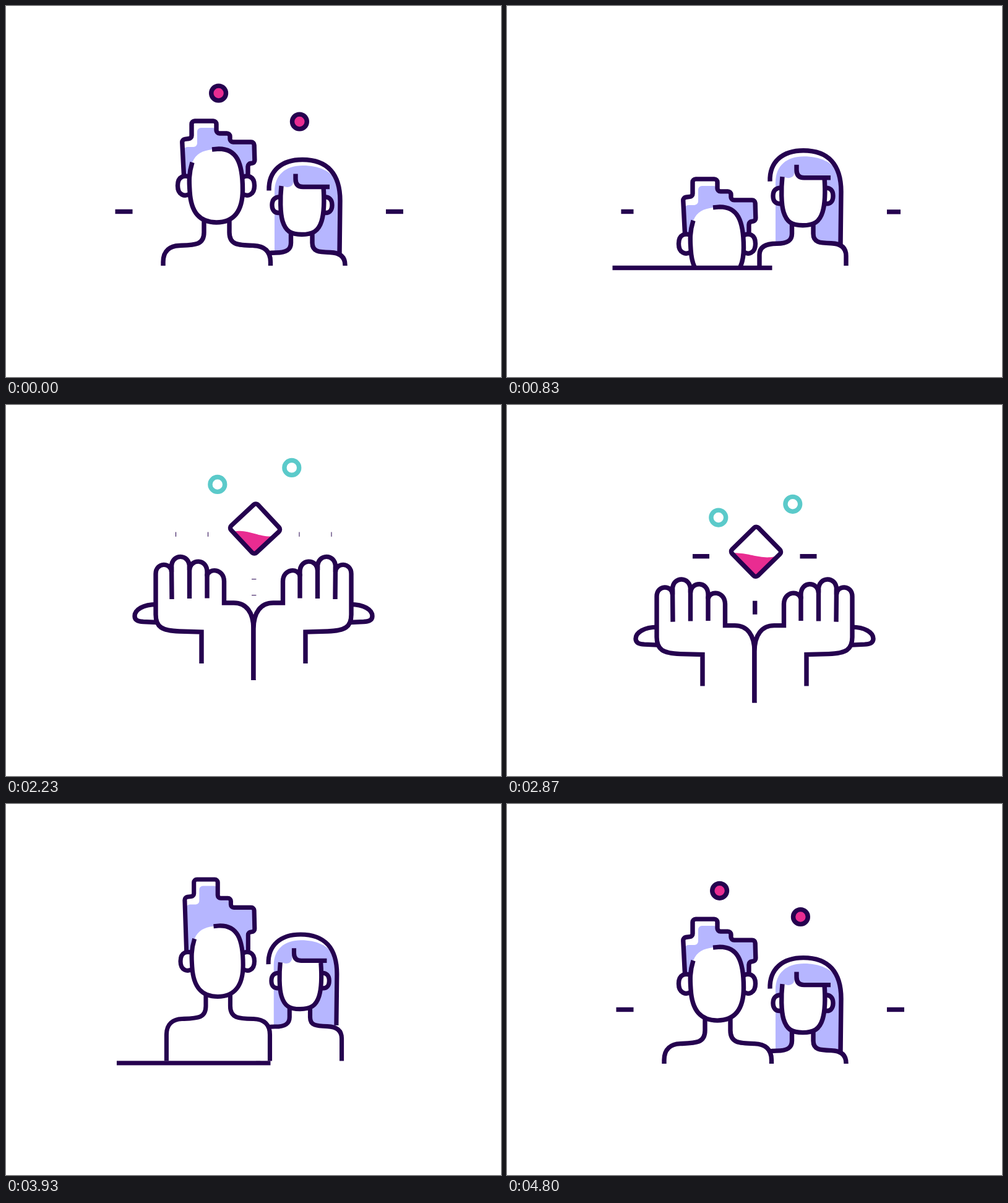
An HTML page with a canvas that plays this animation: 800x600 px, repeating every 4830 ms.

```html
<!DOCTYPE html>
<html>
<head>
<meta charset="utf-8">
<style>
  html, body { margin: 0; width: 100%; height: 100%; overflow: hidden; background: #fff; }
  canvas { display: block; }
</style>
</head>
<body>
<canvas id="stage" width="800" height="600"></canvas>
<script>
const ctx = document.getElementById('stage').getContext('2d');
const LOOP = 4830, HALF = LOOP / 2, GROUND = 420, LINE = 7.4;
const INK = '#25024f', LILAC = '#b6b6ff', PINK = '#e92c91', TEAL = '#5bcaca', WHITE = '#fff';

// Progress of t from a to b, kept within 0..1
const span = (t, a, b) => Math.min(1, Math.max(0, (t - a) / (b - a)));
const easeIn = u => u * u;
const easeOut = u => 1 - (1 - u) ** 2;
const smooth = u => u * u * (3 - 2 * u);
const backIn = u => u * u * (2.7 * u - 1.7);
const arch = u => Math.sin(Math.PI * u);

// Damped swing from 1 to 0
function settle(t, start) {
  const age = Math.max(0, t - start);
  return Math.exp(-.0058 * age) * Math.cos(Math.PI * age / 330);
}

// 0 at rest, 1 when off stage: leaves early in the loop, swings back later
const away = (t, ease, from, to, back) =>
  t < HALF ? ease(span(t, from, to)) : settle(t, back);

const handsY = t =>
  210 * (1 - easeOut(span(t, 1030, 1430)))
  - 23 * arch(span(t, 1740, 2720))
  + 483 * easeIn(span(t, 2720, 3620));

const path = d => new Path2D(d);

function rounded(points, radius) {
  const p = new Path2D();
  p.moveTo(...points[0]);
  for (let i = 1; i < points.length - 1; i++) p.arcTo(...points[i], ...points[i + 1], radius);
  p.lineTo(...points.at(-1));
  return p;
}

const manFace = 'M301 253C295 272 296 285 297 300C299 335 314 350 340 350C368 350 382.500 332 382.500 297C382.500 252 372 231 344 231L333 232';
const man = {
  body: path('M254 700V414C254 395 266 388 280 387.500C305 386.500 320 387 320 366V335H361V366C361 387 376 387 400 387.500C418 388 427.500 397 427.500 414V700'),
  ears: path('M297 277C289 273 277.500 275 277.500 290.500C277.500 306 289 309 297 304M383 277C390 273 401.500 275 401.500 290.500C401.500 306 390 309 383 304'),
  face: path(manFace),
  skin: path(manFace + 'C317 234 307 239 301 253'),
  // The left column rises fully, the right side follows less
  hair(lift) {
    const top = 186 - lift, left = 216 - lift;
    const mid = 206 - .65 * lift, right = 220 - .6 * lift, side = 254 - .4 * lift;
    const back = [[340, mid], [362, mid], [362, right], [401, right], [402, side], [391, side + 1], [391, 276]];
    return {
      fill: rounded([[288, 274], [287, left + 12], [309, left + 12], [309, top + 11], [340, top + 11], ...back], 6),
      line: rounded([[287.5, 274], [284.5, left], [300, left - 2], [300, top], [340, top], ...back], 5)
    };
  }
};

const womanFace = 'M445 291C443 310 443 335 447 348C452 364 460 369.500 478 369.500C496 369.500 505 364 510 348C514 335 515 320 513 292';
const woman = {
  body: path('M408 700V417C408 403 420 399 436 399C452 399 460.500 395 460.500 383V355H495V383C495 397 505 398 524 398.500C539 399 548 405 548 419V700'),
  ears: path('M444 309C435 308 430 313 430 322C430 331 435 336 444 334M514 309C522 308 527 313 527 322C527 331 522 336 514 334'),
  face: path(womanFace),
  skin: path(womanFace + 'H480Q472 292 470 284L465 281C465 288 462 293 454 293Z'),
  fringe: path('M468 271.500V280Q468 292.500 480 292.500H523'),
  hairFill: path('M434 402V300C434 273 452 258 480 258C505 258 526 267 535 284L540 315L539 402Z'),
  hairLine: path('M425 298.500C424 266 446 248.500 479 248.500C520 248.500 540 272 540 315L539 401'),
  hair(lift) {
    const raised = shape => {
      const p = new Path2D();
      p.addPath(shape, new DOMMatrix([1, 0, 0, 1, 0, -.13 * lift]));
      return p;
    };
    return { fill: raised(this.hairFill), line: raised(this.hairLine), fringe: raised(this.fringe) };
  }
};

const thumb = path('M243 345.500C222 345.500 208 354 208 364.500C208 372 215 373 222 373.500L243 374.500');
const fingers = path('M268 337L267.500 284M296.500 336V284M325 335.500V296');

function fill(p, colour) {
  ctx.fillStyle = colour;
  ctx.fill(p);
}

function outlined(p) {
  fill(p, WHITE);
  ctx.stroke(p);
}

function bar(x, y, w, h) {
  if (w < .5 || h < .5) return;
  ctx.fillStyle = INK;
  ctx.fillRect(x, y, w, h);
}

const dash = (x, y, length) => bar(x, y - LINE / 2, length, LINE);

function ring(x, y, line, inside) {
  const p = new Path2D();
  p.arc(x, y, 11.9, 0, 2 * Math.PI);
  fill(p, inside);
  ctx.strokeStyle = line;
  ctx.stroke(p);
  ctx.strokeStyle = INK;
}

function layer(draw) {
  ctx.save();
  draw();
  ctx.restore();
}

function clipAbove(y) {
  ctx.beginPath();
  ctx.rect(-100, -100, 1000, y + 100);
  ctx.clip();
}

function drawPerson(person, y, lift) {
  const hair = person.hair(lift);
  ctx.translate(0, y);
  fill(hair.fill, LILAC);
  outlined(person.body);
  ctx.stroke(hair.line);
  outlined(person.ears);
  fill(person.skin, WHITE);
  ctx.stroke(person.face);
  if (hair.fringe) ctx.stroke(hair.fringe);
}

function drawPeople(t) {
  const entry = span(t, 3560, 4300);
  const zoom = t < HALF ? 1 : 1 - .074 * (1 - smooth(entry));
  const lift = t < HALF ? 0 : 223 * Math.max(0, -settle(t, 3600));
  const breath = 10 * arch(span(t, 0, 560));
  ctx.translate(400, 300);
  ctx.scale(zoom, zoom);
  ctx.translate(-400, -300);
  layer(() => {
    clipAbove(GROUND);
    layer(() => drawPerson(woman, 250 * away(t, backIn, 560, 1060, 3600) * (t < HALF ? .85 : 1), lift));
    layer(() => drawPerson(man, 260 * away(t, easeIn, 560, 1011, 3600) - breath, lift));
  });
  const reach = 258 * Math.sqrt(Math.max(0, arch(t < HALF ? span(t, 560, 1100) : entry)));
  dash(428.5 - reach, GROUND + 3.5, reach);
}

function drawSideDashes(t) {
  const length = 28 * (t < HALF ? 1 - easeIn(span(t, 570, 1060)) : easeOut(span(t, 4250, 4500)));
  const fall = span(t, 830, 1650);
  dash(204.5 - length, 332.5, length);
  if (fall > 0 && fall < 1) {
    const start = 614 + 31 * fall ** 5, end = 645 - 9 * (1 - fall) ** 4;
    dash(start, 332.5 + 175 * easeOut(fall), end - start);
  } else if (t < HALF === t < 1000) {
    dash(614, 332.5, length);
  }
}

function drawDots(t) {
  const height = (rest, leave, back) => rest - (rest + 20) * away(t, backIn, leave, leave + 430, back);
  ring(343.6, height(141, 0, 4020), INK, PINK);
  ring(474.4, height(187, 180, 4140), INK, PINK);
}

function drawDiamond(t, hands) {
  const angle = (10 * Math.exp((1430 - t) / 500) - 45) * Math.PI / 180;
  const slosh = span(t, 1430, 3330), swell = arch(slosh);
  const level = -24 + 14 * slosh + 27 * swell;
  const toss = 78 + 400 * ((t - 1430) / 400) ** 2;
  const box = new Path2D();
  box.roundRect(-29.8, -29.8, 59.6, 59.6, 5);
  ctx.translate(402.5, Math.min(toss, 223.4 + 1.016 * hands));
  layer(() => {
    ctx.rotate(angle);
    fill(box, WHITE);
    ctx.clip(box);
    ctx.rotate(-angle);
    const liquid = path('M-45 50');
    for (let x = -45; x <= 45; x += 3)
      liquid.lineTo(x, level + 6 * (1 - swell) * (1 - (x / 30) ** 2) + 4.5 * swell * Math.sin(x / 16));
    liquid.lineTo(45, 50);
    fill(liquid, PINK);
  });
  ctx.rotate(angle);
  ctx.stroke(box);
}

function drawHands(t, y) {
  const grow = smooth(span(t, 1430, 2230));
  const palm = path(`M316 ${463 - 22 * grow}V390L280 389C252 388 242 382 242 362V296
    C242 277 267 277 267.500 293V284C268 263 296.500 263 296.500 285V290C298 271 325 271 325 293V300
    C327 286 352 287 352.500 308V343H368C388 343 400 358 400 385V${439 + 29 * grow}`);
  const hand = () => {
    outlined(thumb);
    outlined(palm);
    ctx.stroke(fingers);
  };
  ctx.translate(0, y);
  hand();
  ctx.translate(800, 0);
  ctx.scale(-1, 1);
  hand();
}

function drawBurst(t, y) {
  const grow = smooth(span(t, 2200, 2560));
  const side = Math.max(1, 27 * grow), down = Math.max(1, 22 * grow);
  dash(327 - side, y, side);
  dash(473.5, y, side);
  bar(397, y + 72, LINE, down);
  if (side < 2) {
    dash(274, y, 1);
    dash(525.5, y, 1);
    bar(397, y + 98, LINE, 1);
  }
}

function drawGift(t) {
  const y = handsY(t);
  layer(() => {
    if (t < 1430) clipAbove(463);
    layer(() => drawDiamond(t, y));
    layer(() => drawHands(t, y));
  });
  if (t > 2200) drawBurst(t, 231.5 + .97 * y);
  const phase = Math.PI * (t - 2230) / 1100;
  const drop = 190 * settle(t, 1740);
  ring(341.8, 151 + y - drop + 18 * Math.sin(phase), TEAL, WHITE);
  ring(461.8, 142 + y - drop - 18 * Math.cos(phase), TEAL, WHITE);
}

function frame() {
  const t = performance.now() % LOOP;
  fill(path('M0 0H800V600H0Z'), WHITE);
  ctx.strokeStyle = INK;
  ctx.lineWidth = LINE;
  if (t < 1070 || t > 3600) layer(() => drawPeople(t));
  if (t > 1030 && t < 3620) drawGift(t);
  drawSideDashes(t);
  drawDots(t);
  requestAnimationFrame(frame);
}
frame();
</script>
</body>
</html>
```
